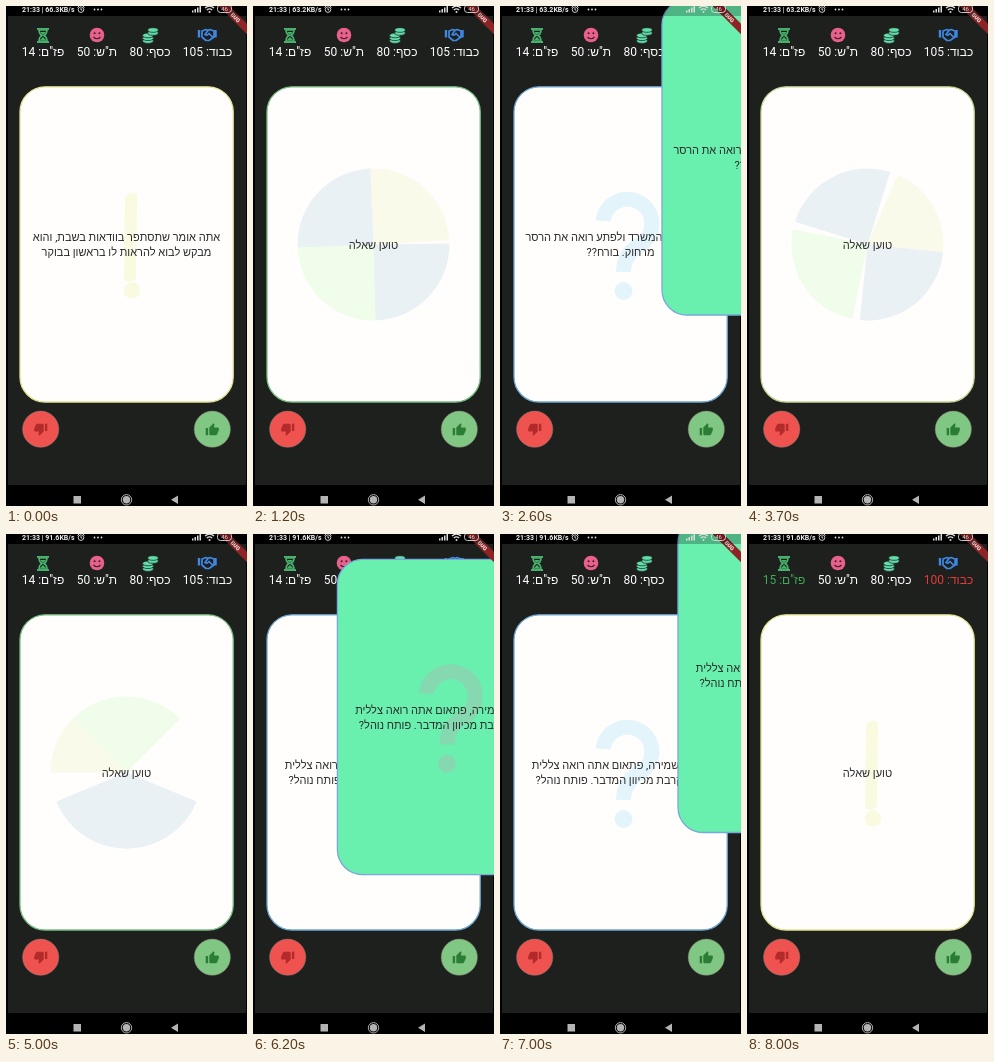
An HTML page that plays this animation: 241 by 500 pixels, repeating every 8.1 s.

```html
<!DOCTYPE html>
<html lang="he">
<head>
<meta charset="utf-8">
<title>Swipe card game</title>
<style>
  html, body { margin: 0; width: 100%; height: 100%; overflow: hidden; background: #000; }
  svg { display: block; width: 100vw; height: 100vh; }
  text { font: 11px Roboto, "Open Sans", "Noto Sans", "Liberation Sans", sans-serif; text-anchor: middle; }
  .he { direction: rtl; }
  #stats text { font-size: 12px; }
  .bar { font-size: 7px; font-weight: 600; fill: #eee; text-anchor: start; }
</style>
</head>
<body>
<svg viewBox="0 0 241 500" preserveAspectRatio="none">
  <rect width="241" height="500"/>
  <rect x="2" y="10" width="238" height="469" fill="#1d201d"/>

  <!-- stat icons -->
  <g fill="#48b06c">
    <path d="M31 22h12v2H31zM31 35h12v2H31z"/>
    <path d="M33 24h8q0 4-3 5.5 3 1.5 3 5.5h-8q0-4 3-5.5-3-1.5-3-5.5z" fill="none" stroke="#48b06c" stroke-width="1.6"/>
    <path d="M34 26h6l-3 3zM34 34l3-3 3 3z"/>
  </g>
  <g>
    <circle cx="91" cy="29" r="7.3" fill="#e8608c"/>
    <circle cx="88.6" cy="27.2" r="1" fill="#3a2028"/>
    <circle cx="93.4" cy="27.2" r="1" fill="#3a2028"/>
    <path d="M87.5 31q3.5 3.6 7 0" fill="none" stroke="#3a2028" stroke-width="1.1"/>
  </g>
  <g fill="#62dcaa" stroke="#1d201d" stroke-width=".7">
    <ellipse cx="142" cy="35" rx="5.5" ry="2.4"/>
    <ellipse cx="142" cy="32.2" rx="5.5" ry="2.4"/>
    <ellipse cx="142" cy="29.4" rx="5.5" ry="2.4"/>
    <ellipse cx="147" cy="27" rx="5.3" ry="2.3"/>
    <ellipse cx="147" cy="24" rx="5.3" ry="2.3"/>
  </g>
  <g fill="none" stroke="#3f88e4" stroke-width="1.7" stroke-linejoin="round">
    <path d="M196 25l4-1.5 2 1 2-1 4 1.5v6l-5 3.5h-3l-4-3.5zM202 24.5l-3 4q2 1.5 4-1l4 4"/>
    <path d="M193 24v7.5M209.5 24v7.5" stroke-width="2.4"/>
  </g>
  <g id="stats"></g>

  <!-- answer buttons -->
  <g stroke="#8a7a72" stroke-width=".5">
    <circle cx="34.7" cy="423.2" r="18.1" fill="#ef5350"/>
    <circle cx="206.3" cy="423.2" r="18.1" fill="#81c784"/>
  </g>
  <defs>
    <path id="thumb" d="M1 21h4V9H1zM23 10q0-2-2-2h-6.3l1-5-1.5-2L7 8v11q0 2 2 2h9q1.3 0 1.8-1.2l3-7z"/>
  </defs>
  <use href="#thumb" fill="#2a7d32" transform="translate(206.3 423.2) scale(.6) translate(-12 -11)"/>
  <use href="#thumb" fill="#b32a2a" transform="translate(34.7 423.7) rotate(180) scale(.6) translate(-12 -11)"/>

  <g id="cards"></g>

  <!-- debug ribbon -->
  <g transform="translate(229.5 11.5) rotate(45)">
    <rect x="-30" y="-3.8" width="60" height="7.6" fill="#8d2325"/>
    <text y="2" style="font-size:5.5px;font-weight:800" fill="#eee">BUG</text>
  </g>

  <!-- status bar -->
  <rect width="241" height="10" fill-opacity=".25"/>
  <text id="clock" class="bar" x="16" y="6"></text>
  <g fill="none" stroke="#ddd" stroke-width=".9">
    <circle cx="75" cy="3.6" r="2.8"/>
    <path d="M75 2v2h1.3M71.5 1.5l1.5-1.5M78.5 1.5l-1.5-1.5"/>
    <rect x="211.5" y="-1" width="14" height="7.5" rx="3"/>
    <path d="M199 2q4.500-4 9 0M200.8 4q2.700-2.300 5.400 0" stroke-width="1.3"/>
  </g>
  <g fill="#ddd">
    <circle cx="88.5" cy="3.5" r=".9"/><circle cx="92" cy="3.5" r=".9"/><circle cx="95.5" cy="3.5" r=".9"/>
    <path d="M186 6.500v-2h1.5v2zM188.5 6.500v-3.500h1.5v3.5zM191 6.500v-5h1.500v5zM193.5 6.500v-6.500h1.500v6.500z"/>
    <circle cx="203.5" cy="6" r="1"/>
    <text x="218.5" y="5.2" style="font-size:6px">46</text>
  </g>

  <!-- navigation bar -->
  <g fill="#b4b4b4">
    <rect x="67.5" y="490" width="7.5" height="7.5"/>
    <circle cx="120.5" cy="493.8" r="3.7"/>
    <circle cx="120.5" cy="493.8" r="5.2" fill="none" stroke="#b4b4b4"/>
    <path d="M165 493.800l7-4.300v8.600z"/>
  </g>
</svg>

<script>
const LOOP = 8100, STEP = 100;
const BLUE = '#6fa9d2', YELLOW = '#e4e492', GREEN = '#78c084', LIME = '#c3d692';
const LOADING = ['טוען שאלה'];
const Q1 = ['אתה אומר שתסתפר בוודאות בשבת, והוא', 'מבקש לבוא להראות לו בראשון בבוקר'];
const Q2 = ['אתה יוצא מהמשרד ולפתע רואה את הרסר', 'מרחוק. בורח??'];
const Q3 = ['בזמן השמירה, פתאום אתה רואה צללית', 'שמתקרבת מכיוון המדבר. פותח נוהל?'];

// drag: [time, dx, dy]; spin: phase in degrees when the scene starts
const SCENES = [
  { at: 0, lines: Q1, mark: '!', border: YELLOW, drag: [[0, 0, 0], [200, 48, -30], [400, 148, -87], [800, 224, -112]] },
  { at: 900, lines: LOADING, spin: 261.9, border: GREEN },
  { at: 1900, lines: LOADING, mark: '?', border: BLUE },
  { at: 2000, lines: Q2, mark: '?', border: BLUE, drag: [[2200, 0, 0], [2400, 48, -30], [2600, 148, -87], [3000, 222, -112]] },
  { at: 3700, lines: LOADING, spin: 5.8, border: LIME },
  { at: 4000, lines: LOADING, spin: 103.1, border: GREEN },
  { at: 5300, lines: LOADING, mark: '?', border: BLUE },
  { at: 5400, lines: Q3, mark: '?', border: BLUE, drag: [[5600, 0, 0], [6100, 60, -48], [6600, 112, -85], [7400, 216, -110]] },
  { at: 7700, lines: LOADING, spin: 5.8, border: LIME },
  { at: 8000, lines: LOADING, mark: '!', border: YELLOW }
];
const SPIN_RATE = 0.3244; // degrees per ms

// each quarter turns at its own multiple of the phase
const QUARTERS = [
  { base: 270, pace: 4, fill: '#fafaea' },
  { base: 0, pace: 1, fill: '#e9f1f5' },
  { base: 90, pace: 2, fill: '#effdea' },
  { base: 180, pace: 3, fill: '#e9f1f5' }
];

const byId = id => document.getElementById(id);
const latest = (rows, t) => rows.filter(row => row.at <= t).pop();

function label(text, x, y, fill) {
  return `<text class="he" x="${x}" y="${y}" fill="${fill}">${text}</text>`;
}

function spinner(phase) {
  return QUARTERS.map(({ base, pace, fill }) =>
    `<path d="M0 0H76A76 76 0 0 1 0 76z" fill="${fill}" transform="translate(120.5 238.5) rotate(${base + pace * phase})"/>`
  ).join('');
}

function markShape(mark, dragged) {
  if (mark === '!') {
    const color = dragged ? '#8ee6a8' : '#fafae0';
    return `<g fill="${color}"><path d="M119 191q5-6 12-3l-1 84q-5 6-12 2z"/><circle cx="126" cy="284.5" r="8.3"/></g>`;
  }
  const color = dragged ? '#86d8b0' : '#e3f4fa';
  return `<path d="M103 215A24.5 24.5 0 1 1 141 238Q124 247 123.5 266" fill="none" stroke="${color}" stroke-width="15"/>
    <circle cx="123.5" cy="285" r="9" fill="${color}"/>`;
}

function card({ lines, mark, border }, inner, dx = 0, dy = 0, dragged = false) {
  const tint = dragged ? Math.min(100, dx * 1.6) : 0;
  const top = lines.length > 1 ? 235 : 242.5;
  return `<g transform="translate(${dx} ${dy})">
    <rect x="14" y="80.8" width="213.2" height="315.2" rx="25" stroke="${dragged ? '#76a9dc' : border}"
      stroke-width="1.3" style="fill:color-mix(in srgb, #69f0ae ${tint}%, #fffefd)"/>
    ${mark ? markShape(mark, dragged) : inner}
    ${lines.map((line, i) => label(line, 120.5, top + i * 15, '#2a2a2a')).join('')}
  </g>`;
}

function along(path, t) {
  const next = path.findIndex(point => point[0] > t);
  if (next === 0) return [0, 0];
  if (next < 0) return path[path.length - 1].slice(1);
  const [a, b] = [path[next - 1], path[next]];
  const k = (t - a[0]) / (b[0] - a[0]);
  return [1, 2].map(i => a[i] + (b[i] - a[i]) * k);
}

function stats(t) {
  const answered = t >= 7700;
  return label('פז"ם: ' + (answered ? 15 : 14), 37, 49.5, answered ? '#43a85a' : '#fff')
    + label('ת"ש: 50', 91, 49.5, '#fff')
    + label('כסף: 80', 144, 49.5, '#fff')
    + label('כבוד: ' + (answered ? 100 : 105), 201.5, 49.5, answered ? '#e23c3c' : '#fff');
}

function draw(t) {
  const scene = latest(SCENES, t);
  const inner = scene.spin === undefined ? '' : spinner(scene.spin + SPIN_RATE * (t - scene.at));
  let cards = card(scene, inner);
  if (scene.drag) {
    const [dx, dy] = along(scene.drag, t);
    if (dx > 0) cards += card(scene, inner, dx, dy, true);
  }
  byId('cards').innerHTML = cards;
  byId('stats').innerHTML = stats(t);
  const speed = t < 1000 ? '66.3' : t < 4500 ? '63.2' : '91.6';
  byId('clock').textContent = `21:33 | ${speed}KB/s`;
}

const start = performance.now();
let shown = -1;
function tick() {
  const t = Math.floor((performance.now() - start) % LOOP / STEP) * STEP;
  if (t !== shown) draw(shown = t);
  requestAnimationFrame(tick);
}
tick();
</script>
</body>
</html>
```
